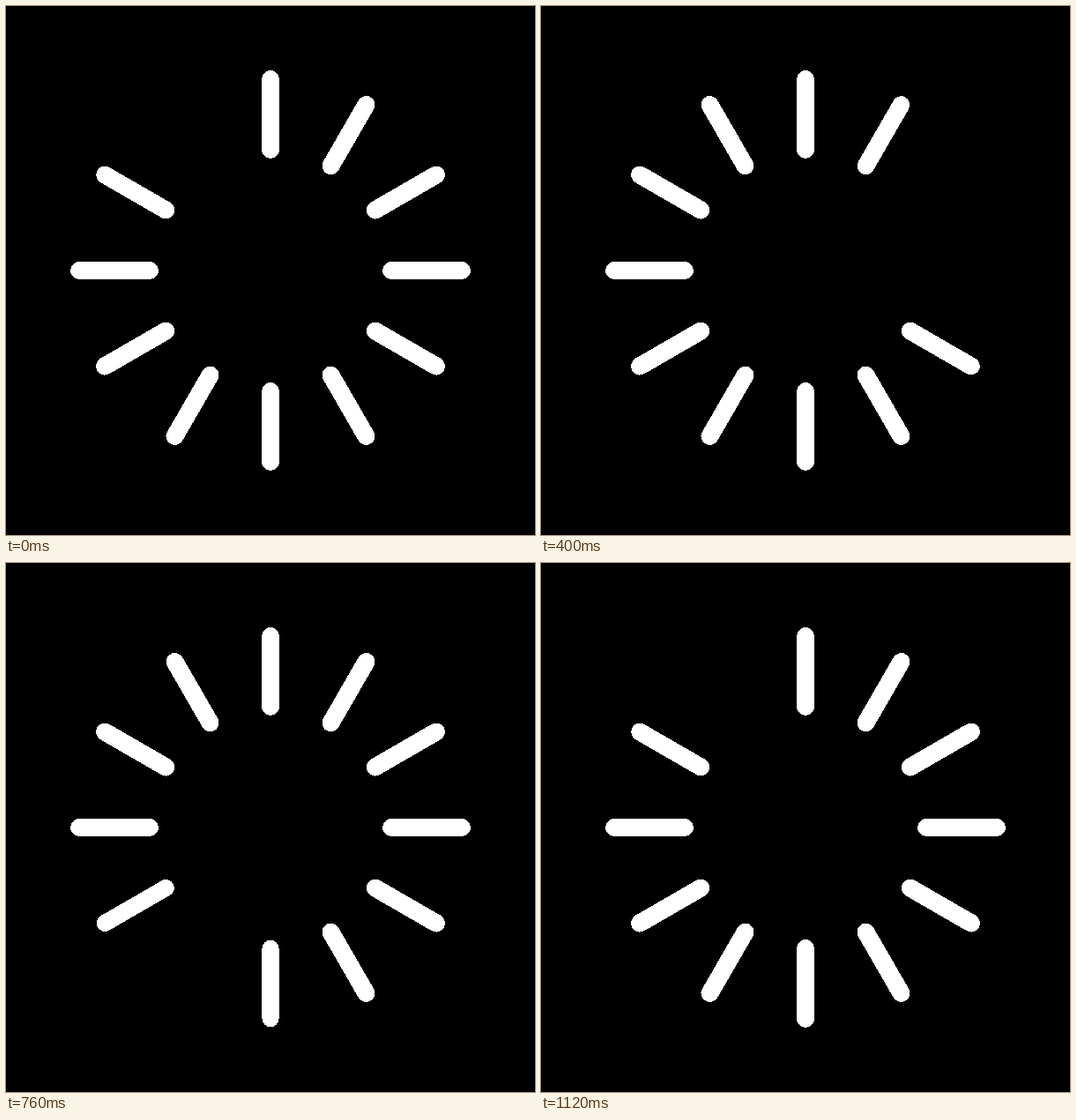
Animation, 600 px wide and 600 px high, one loop 1160 ms. Source, as an HTML page with a canvas:

```html
<!DOCTYPE html>
<html lang="en">
<head>
<meta charset="utf-8">
<title>Spinner</title>
<style>
  html, body { margin: 0; height: 100%; overflow: hidden; background: #000; }
  canvas { display: block; }
</style>
</head>
<body>
<canvas id="stage" width="600" height="600"></canvas>
<script>
const SIZE = 600, BARS = 12, STEP = 40, STEPS = 29, CYCLE = 28, FADE = 4;
const ctx = document.getElementById("stage").getContext("2d", { willReadFrequently: true });
ctx.lineWidth = 20;
ctx.lineCap = "round";
ctx.strokeStyle = "#fff";

// Each bar dips to zero opacity two steps after the one before it.
function opacity(bar, step) {
  const gap = Math.abs(step % CYCLE - (2 * bar + 5));
  return Math.min(1, Math.min(gap, CYCLE - gap) / FADE);
}

function drawBar(bar, alpha) {
  ctx.save();
  ctx.translate(SIZE / 2, SIZE / 2);
  ctx.rotate(bar * 2 * Math.PI / BARS);
  ctx.globalAlpha = alpha;
  ctx.beginPath();
  ctx.moveTo(0, -137);
  ctx.lineTo(0, -217);
  ctx.stroke();
  ctx.restore();
}

// Pixels are either fully white or clear, cut at half opacity.
function harden() {
  const image = ctx.getImageData(0, 0, SIZE, SIZE), px = image.data;
  for (let i = 0; i < px.length; i += 4) {
    const on = px[i + 3] > 126 ? 255 : 0;
    px[i] = px[i + 1] = px[i + 2] = px[i + 3] = on;
  }
  ctx.putImageData(image, 0, 0);
}

let shown = -1;
function tick() {
  const step = Math.floor(performance.now() / STEP) % STEPS;
  if (step !== shown) {
    shown = step;
    ctx.clearRect(0, 0, SIZE, SIZE);
    for (let bar = 0; bar < BARS; bar++) drawBar(bar, opacity(bar, step));
    harden();
  }
  requestAnimationFrame(tick);
}
tick();
</script>
</body>
</html>
```
